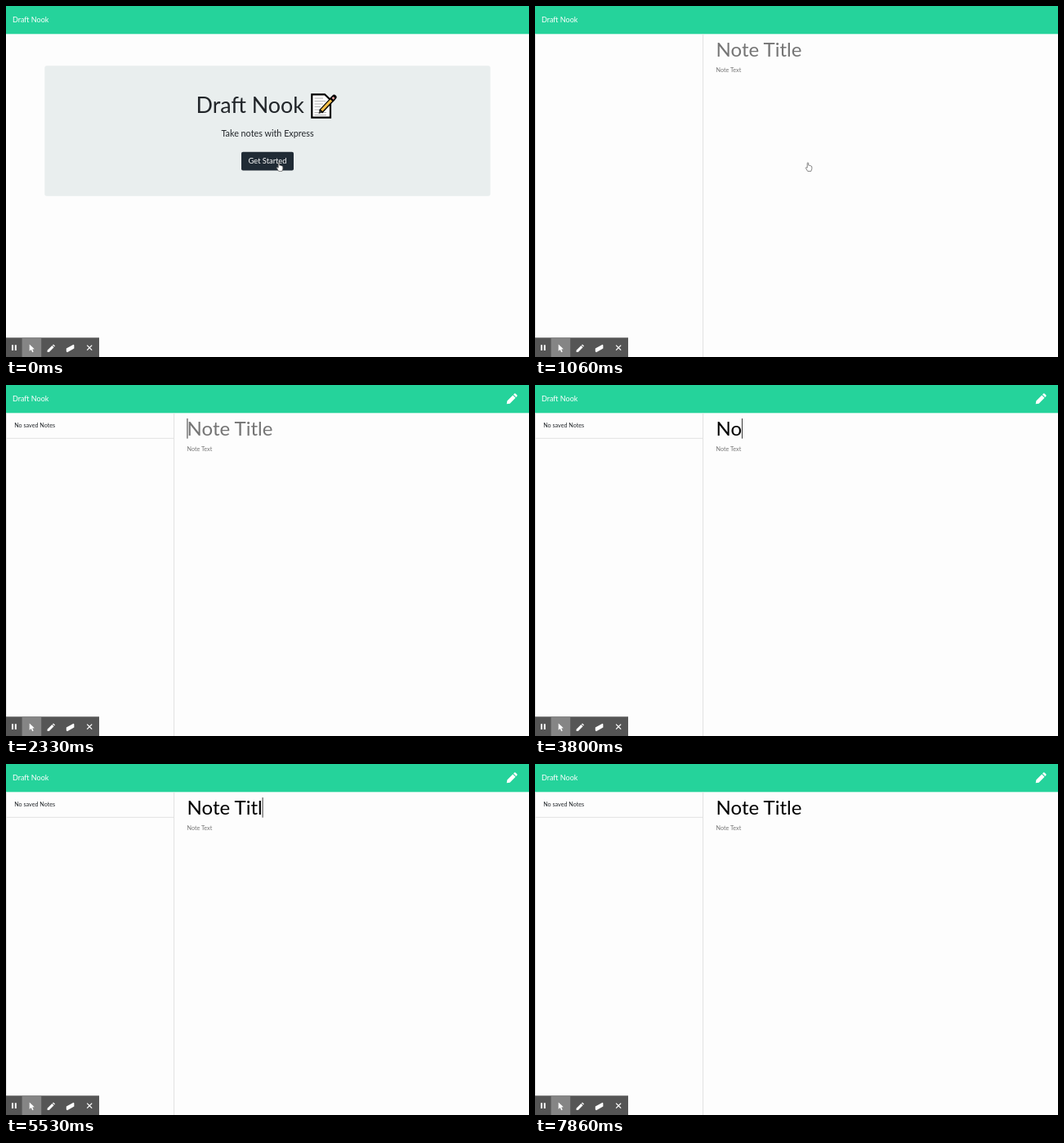
An HTML page that plays this animation: 640x430 px, repeating every 8 s.

```html
<!DOCTYPE html>
<html lang="en">
<head>
<meta charset="utf-8">
<title>Draft Nook</title>
<style>
  html, body { margin: 0; width: 100%; height: 100%; overflow: hidden; background: #fdfdfd; }
  svg { display: block; width: 640px; height: 430px; font-family: Lato, sans-serif; }
  text { white-space: pre; }
  .small { font-size: 7.2px; }
  .title { font-size: 24px; }
</style>
</head>
<body>
<svg viewBox="0 0 640 430">
  <rect width="640" height="34.3" fill="#25d39b"/>
  <text x="8" y="20.3" font-size="9" fill="#fff">Draft Nook</text>

  <g id="home">
    <rect x="47.3" y="73.3" width="545.4" height="159.4" rx="2.3" fill="#e9eeee"/>
    <text x="232.5" y="131.2" font-size="26.88" fill="#212529">Draft Nook</text>
    <g id="memo">
      <path d="M374.3 108.3H390L397 115V136.7H374.3Z" fill="#fff" stroke="#000" stroke-width="2.2"/>
      <path d="M377.5 113H388M377.5 116.5H391M377.5 120H388M377.5 123.5H385M377.5 127H383M377.5 130.5H392M377.5 133.6H392" stroke="#aaa" stroke-width=".9"/>
      <path d="M385 129.5L400.5 113" stroke="#000" stroke-width="5.6"/>
      <path d="M398.5 115L401.5 111.8" stroke="#000" stroke-width="6" stroke-linecap="round"/>
      <path d="M386.2 128L398 115.5" stroke="#f5c04a" stroke-width="3.2"/>
      <path d="M399.6 113.8L401.4 111.9" stroke="#e9a4a0" stroke-width="2.8"/>
      <path d="M382.5 132L383.7 127.2L387.3 130.5Z" fill="#333"/>
    </g>
    <text x="320" y="160" font-size="10.8" fill="#212529" text-anchor="middle">Take notes with Express</text>
    <rect id="ring" x="287.3" y="178" width="65.4" height="24.2" rx="2.8" fill="#899196"/>
    <rect id="button" x="288" y="178.8" width="64" height="22.6" rx="2"/>
    <text x="320" y="193.3" font-size="9.3" fill="#fff" text-anchor="middle">Get Started</text>
  </g>

  <g id="notes">
    <path d="M.4 34.5V430M205.6 34.5V430" stroke="#dedede" stroke-width=".9"/>
    <g id="loaded">
      <path d="M0 65.3H205.6" stroke="#dfdfdf" stroke-width=".9"/>
      <text class="small" x="10.2" y="52.4" fill="#212529">No saved Notes</text>
      <path d="M612.7 23.2L613.3 19.4L620.2 12.5L623.5 15.8L616.6 22.7ZM621 11.7L622.1 10.6Q622.9 10 623.7 10.7L625.3 12.3Q626 13.1 625.3 13.9L624.2 15Z" fill="#fff"/>
    </g>
    <text id="placeholder" class="title" x="221.6" y="61.6" fill="#757575">Note Title</text>
    <text id="typed" class="title" x="221.6" y="61.6"></text>
    <text class="small" x="221.6" y="80.6" fill="#757575">Note Text</text>
    <rect id="titleCaret" y="41" width=".9" height="24.6" fill="#222"/>
    <rect id="textCaret" x="221.7" y="73.5" width=".6" height="9" fill="#222"/>
  </g>

  <path id="hand" d="M333.2 198.2V192.4Q333.9 191.1 334.7 192.4V195.2Q335.6 194.7 336 195.6Q337 195.1 337.3 196Q338.6 195.7 338.8 197V199.6L337.8 202.4H333.7L331.2 198.3Q331.4 197 333.2 198.2Z" fill="#fff" stroke="#555" stroke-width=".7" stroke-linejoin="round"/>

  <g id="toolbar">
    <rect y="406.3" width="114" height="23.7" fill="#555"/>
    <rect x="19.6" y="406.3" width="23.6" height="23.7" fill="#858585"/>
    <path d="M8 415.2V422M11.8 415.2V422" stroke="#fff" stroke-width="2"/>
    <path d="M28.7 414.6V422.7L30.7 421L32.3 424.3L33.7 423.6L32.2 420.4L34.8 420.2Z" fill="#fff"/>
    <path d="M50.6 424V421.8L56.4 416L58.6 418.2L52.8 424ZM57 415.4L58 414.6L60 416.6L59.2 417.6Z" fill="#fff"/>
    <path d="M73.8 419.6L82.6 414.8L83.4 415.4V419.4L75 424.2L73.8 423.2Z" fill="#fff"/>
    <path d="M99.2 415.6L105.2 421.6M105.2 415.6L99.2 421.6" stroke="#fff" stroke-width="1.3"/>
  </g>
</svg>
<script>
const LOOP = 8000, BLINK = 530;
const PRESS = 600, OPEN = 1060, LOADED = 1200, HIDE_HAND = 1660;
const FOCUS_TITLE = 2060, FOCUS_TEXT = 7330;
const TITLE = 'Note Title';
const keyTimes = [3400, 3800, 4000, 4260, 4600, 4860, 5060, 5260, 5460, 5730];

const el = id => document.getElementById(id);
const show = (id, on) => { el(id).style.display = on ? '' : 'none'; };
const blinkOn = since => since >= 0 && Math.floor(since / BLINK) % 2 === 0;

function draw(t) {
  const press = Math.min(1, Math.max(0, (t - PRESS) / 150));
  el('ring').style.opacity = press;
  el('button').style.fill = press ? '#1b272c' : '#202b35';

  show('home', t < OPEN);
  show('notes', t >= OPEN);
  show('loaded', t >= LOADED);
  show('hand', t < HIDE_HAND);

  const count = keyTimes.filter(k => k <= t).length;
  const typed = el('typed');
  typed.textContent = TITLE.slice(0, count);
  show('placeholder', !count);

  const lastInput = count ? keyTimes[count - 1] : FOCUS_TITLE;
  const width = count && t >= OPEN ? typed.getComputedTextLength() : 0;
  el('titleCaret').setAttribute('x', 221.5 + width);
  show('titleCaret', t < FOCUS_TEXT && blinkOn(t - lastInput));
  show('textCaret', blinkOn(t - FOCUS_TEXT));
}

const start = performance.now();
function tick() {
  draw((performance.now() - start) % LOOP);
  requestAnimationFrame(tick);
}
tick();
</script>
</body>
</html>
```
